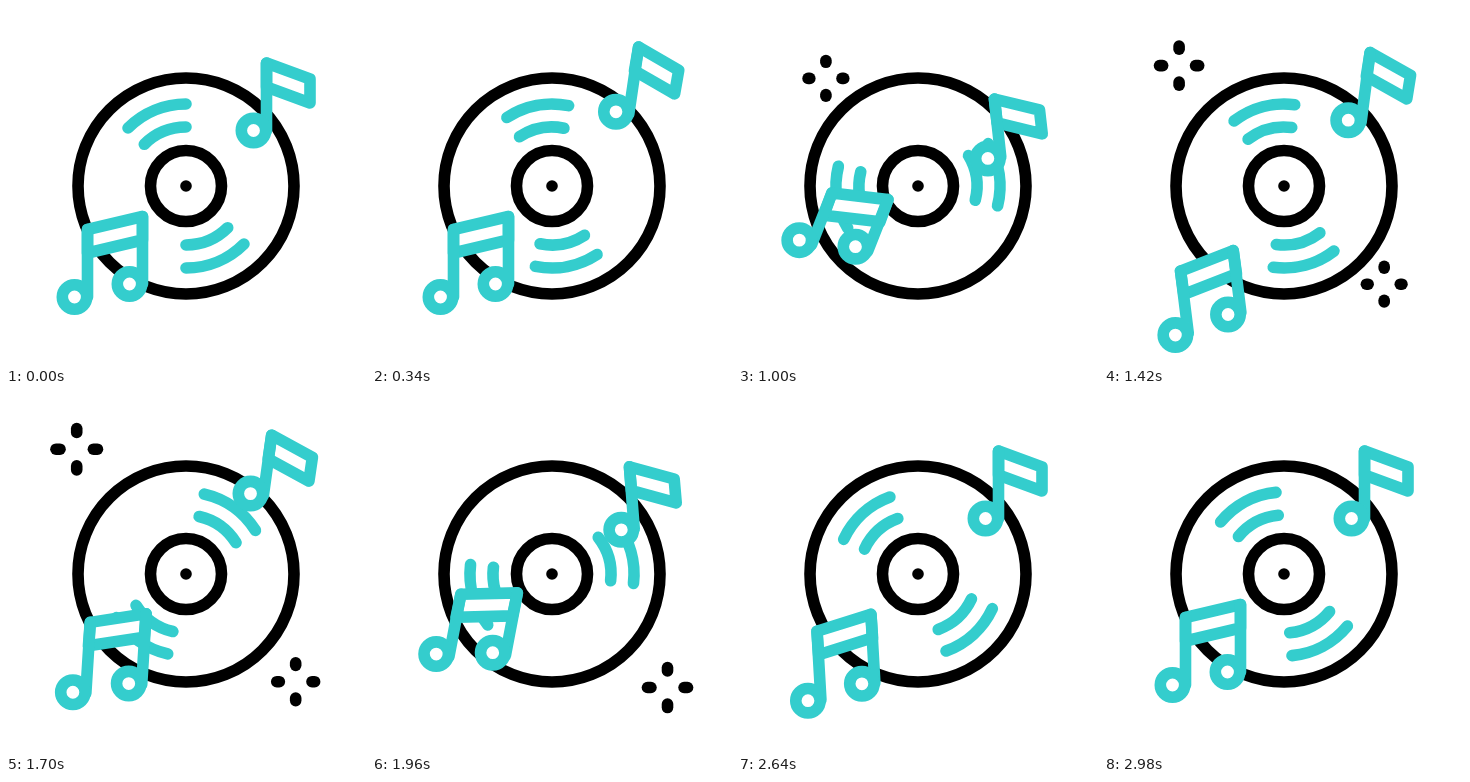
These frames come from a looping animation (360x360 px, 3000 ms). An HTML page with a canvas:

```html
<!DOCTYPE html>
<html>
<head>
<meta charset="utf-8">
<title>Record and notes</title>
<style>
html, body { margin: 0; width: 100%; height: 100%; overflow: hidden; background: #fff; }
canvas { display: block; width: 360px; height: 360px; }
</style>
</head>
<body>
<canvas id="stage" width="360" height="360"></canvas>
<script>
const ctx = document.getElementById('stage').getContext('2d');
const LOOP = 3000, TEAL = '#34cdcd', LINE = 11.6, RAD = Math.PI / 180;
const clamp = v => Math.min(1, Math.max(0, v));
const smooth = s => s * s * (3 - 2 * s);

// Eased value at time t through swing peaks at fixed times.
const SWING = [160, 630, 1110, 1590, 2110, 2590];
function swing(t, values) {
  if (t <= SWING[0]) return values[0];
  for (let i = 1; i < SWING.length; i++) {
    if (t < SWING[i]) {
      const s = smooth((t - SWING[i - 1]) / (SWING[i] - SWING[i - 1]));
      return values[i - 1] + (values[i] - values[i - 1]) * s;
    }
  }
  return values[values.length - 1];
}
const HEAD = [0, -57, 41, -31, 22, 0];
const TOP = [0, -38, 42, -24, 22, 0];
const TILT = [0, 21, -8, 12.5, -7, 0];

function path(points, close, fill) {
  ctx.beginPath();
  points.forEach(p => ctx.lineTo(p[0], p[1]));
  if (close) ctx.closePath();
  if (fill) { ctx.fillStyle = fill; ctx.fill(); }
  ctx.stroke();
}

function ring(x, y, r, fill) {
  ctx.beginPath();
  ctx.arc(x, y, r, 0, 7);
  if (fill) { ctx.fillStyle = fill; ctx.fill(); }
  ctx.stroke();
}

// Cubic ease that is cut off by the loop just before it settles.
function spin(t) {
  let lo = 0, hi = 1;
  for (let i = 0; i < 30; i++) {
    const s = (lo + hi) / 2;
    if (s * (3395 - 2524 * s + 2518 * s * s) < t) lo = s; else hi = s;
  }
  return 360 * smooth(lo);
}

function record(t) {
  ctx.strokeStyle = ctx.fillStyle = '#000';
  ring(180, 180, 108);
  ring(180, 180, 35.5);
  ctx.beginPath();
  ctx.arc(180, 180, 5.8, 0, 7);
  ctx.fill();
  ctx.strokeStyle = TEAL;
  const angle = spin(t);
  for (const side of [0, 180]) {
    for (const r of [59, 82]) {
      ctx.beginPath();
      ctx.arc(180, 180, r, (angle + side - 135) * RAD, (angle + side - 90) * RAD);
      ctx.stroke();
    }
  }
}

function note(t, x, y, flag, depth, heads) {
  const tilt = swing(t + 45, TILT), a = tilt * RAD;
  const turn = (dx, dy) => [dx * Math.cos(a) - dy * Math.sin(a), dx * Math.sin(a) + dy * Math.cos(a)];
  const add = (p, q) => [p[0] + q[0], p[1] + q[1]];
  const top = [x + 0.62 * tilt, y + swing(t + 30, TOP)];
  const head = [x - 13 - 0.36 * tilt, y + 67.5 + swing(t, HEAD)];
  const far = turn(...flag), down = turn(0, depth);
  ctx.strokeStyle = TEAL;
  path([top, add(top, far), add(add(top, far), down), add(top, down)], true, '#fff');
  for (let i = 0; i < heads; i++) {
    const shift = i ? far : [0, 0];
    const h = add(head, shift);
    path([add(top, shift), add(h, turn(13, 0))]);
    ring(h[0], h[1], 12.2, '#fff');
  }
}

function sparkle(t, x, y, dir) {
  const u = t / 1150;
  if (u <= 0 || u >= 1) return;
  const drift = dir * (28 * (1 - (1 - u) ** 2) - 9.6);
  const grow = smooth(clamp(t / 180));
  const gap = 16.4 * grow + 2.9 * u;
  const half = 0.5 + 1.9 * u;
  ctx.save();
  ctx.translate(x + drift, y + drift);
  ctx.strokeStyle = '#000';
  ctx.lineWidth = LINE * grow * smooth(clamp((1150 - t) / 150));
  for (let i = 0; i < 4; i++) {
    ctx.rotate(Math.PI / 2);
    path([[gap - half, 0], [gap + half, 0]]);
  }
  ctx.restore();
}

function draw(t) {
  ctx.fillStyle = '#fff';
  ctx.fillRect(0, 0, 360, 360);
  ctx.lineWidth = LINE;
  ctx.lineCap = ctx.lineJoin = 'round';
  sparkle(t - 780, 88, 72.5, -1);
  sparkle(t - 1210, 280.5, 278.5, 1);
  record(t);
  note(t, 260.5, 57, [43.5, 16], 24, 1);
  note(t - 360, 81.5, 223.5, [55, -13], 23.5, 2);
}

let start;
function frame(now) {
  start ??= now;
  draw((now - start) % LOOP);
  requestAnimationFrame(frame);
}
draw(0);
requestAnimationFrame(frame);
</script>
</body>
</html>
```
